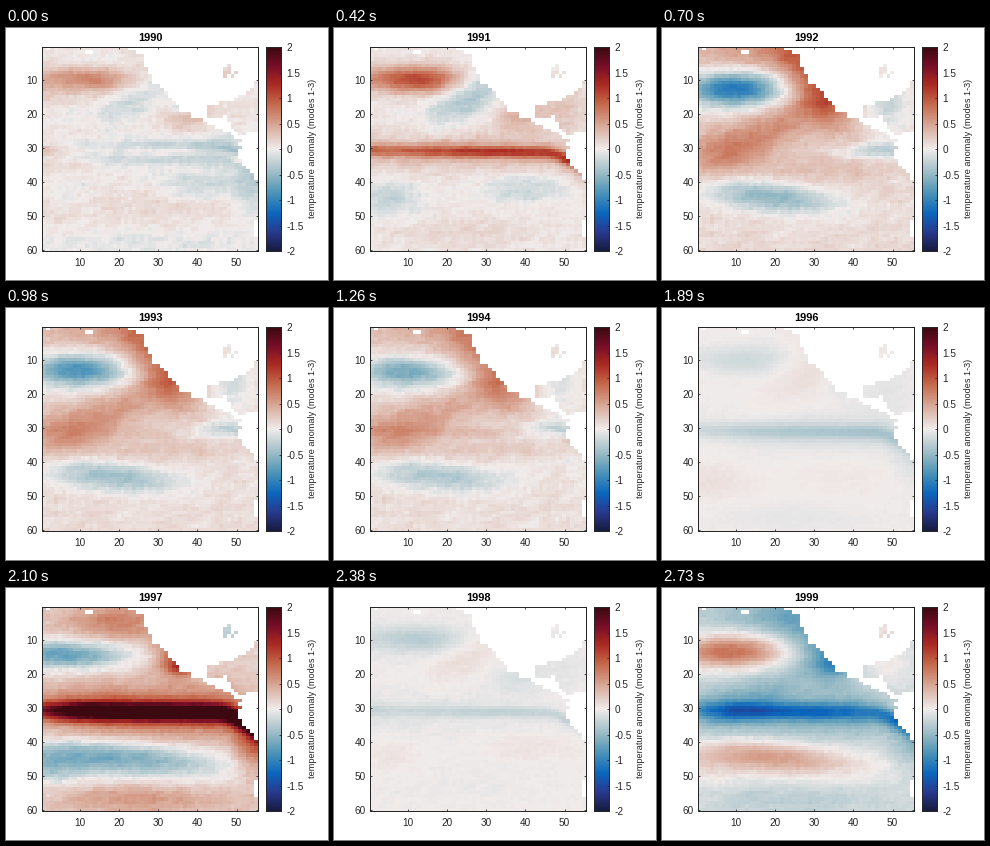
Recreate the animation shown at these times as a matplotlib script. Size 322x252 px, loop 2.8 s.

```python
import numpy as np
import matplotlib.pyplot as plt
from matplotlib.animation import FuncAnimation
from matplotlib.colors import LinearSegmentedColormap
from matplotlib.path import Path

W, H, DPI = 322, 252, 100
FRAMES, STEP = 40, 70
COLS, ROWS = 55, 60
PT = 72 / DPI  # points per pixel
INK = "#262626"

plt.rcParams["font.family"] = "Liberation Sans"

# Diverging blue-white-red scale
cold = ["#171c42", "#293a8f", "#0b66bd", "#4590b9", "#8eb5c2", "#d0d9db"]
warm = ["#e6d2cc", "#d59d89", "#c46548", "#ac2b24", "#780e28", "#3c0911"]
stops = np.insert(np.linspace(0, 1, 12), 6, 0.5)
balance = LinearSegmentedColormap.from_list(
    "balance", list(zip(stops, cold + ["#f1eceb"] + warm)))
balance.set_bad("white")

x, y = np.meshgrid(np.arange(1, COLS + 1), np.arange(1, ROWS + 1))


def bump(x0, y0, sx, sy, tilt=0.0):
    """Gaussian patch whose long axis may slope by tilt rows per column."""
    dx = x - x0
    dy = y - y0 - tilt * dx
    return np.exp(-0.5 * ((dx / sx) ** 2 + (dy / sy) ** 2))


def band(width):
    """Equatorial strip that bends south along the eastern coast."""
    mid = 30.9 + 0.6 * x / 45 + 0.12 * np.maximum(0, x - 45) ** 1.6
    return np.exp(-0.5 * ((y - mid) / width) ** 2)


def grain(seed):
    """Faint streaky texture."""
    n = np.random.default_rng(seed).normal(size=(ROWS, COLS))
    return 0.018 * (n + np.roll(n, 1, 1) + np.roll(n, 2, 1) + np.roll(n, 1, 0))


def scatter(mask, seed, count, center, spread, value):
    """Set a few random cells of the mask around a center."""
    cells = np.random.default_rng(seed).normal(center, spread, (count, 2))
    for c, r in cells.round().astype(int):
        mask[max(r, 1) - 1, c - 1] = value


def land_mask():
    pacific = [(20.5, 0), (26, 3), (28.4, 10), (36, 19), (48, 26),
               (51.5, 28), (50.3, 33), (56, 40.5)]
    atlantic = [(56, 25.5), (50, 26), (47, 21), (43, 22), (42.2, 18),
                (49, 16.3), (56, 10.5), (56, 0)]
    cells = np.column_stack([x.ravel(), y.ravel()]).astype(float)
    cells += np.random.default_rng(4).normal(0, 0.25, cells.shape)
    mask = Path(pacific + atlantic).contains_points(cells).reshape(ROWS, COLS)
    mask |= bump(56, 54, 1.2, 3) > 0.5             # southern tip
    scatter(mask, 5, 10, (48, 8), (1.4, 0.9), False)  # lakes
    scatter(mask, 6, 4, (10, 1.5), (3, 0.4), True)    # islands
    return mask


# Three spatial modes
narrow = (0.04 + (0.5 + 0.4 * np.minimum(x / 28, 1)) * band(1.25)
          + 0.3 * band(4)
          + 0.78 * bump(15, 10, 6, 2.8) + 0.6 * bump(4, 10, 8, 2.7)
          - 0.4 * bump(25, 16, 7, 4.2, -0.5)
          + 0.35 * bump(38, 21, 4, 3) + 0.25 * bump(50, 19, 5, 4)
          - 0.3 * bump(5, 45, 6, 3.5) - 0.25 * bump(40, 42, 8, 3)
          + 0.12 * bump(25, 55, 12, 3) + grain(1))

arc = (0.12 - 1.25 * bump(9.5, 13, 8.5, 3.4)
       + 0.4 * bump(16, 2, 14, 3.5) + 0.75 * bump(30, 11, 7, 7, 1.0)
       + 0.5 * bump(20, 24, 14, 5, -0.5) + 0.3 * bump(6, 31, 7, 5)
       + 0.18 * bump(30, 36, 14, 4) - 0.5 * bump(46, 31, 7, 1.7)
       - 0.65 * bump(19, 44.5, 12, 3.2, 0.12) - 0.35 * bump(48, 16, 5, 7)
       + grain(2))

wide = (0.2 + (0.9 + 0.9 * np.minimum(x / 10, 1)) * band(1.8)
        + (0.4 + 0.4 * np.minimum(x / 15, 1)) * band(5)
        + 0.5 * bump(20, 5, 10, 4)
        + 0.6 * bump(34, 15, 4, 4) + 0.7 * bump(36, 18, 2.5, 2)
        - 0.95 * bump(6, 14.5, 12, 3)
        - 0.85 * bump(20, 45, 18, 3.7, 0.08) - 0.45 * bump(1, 48, 7, 4)
        + 0.35 * bump(25, 57, 16, 3) + 0.45 * bump(54, 43, 3, 5)
        - 0.5 * bump(48, 8, 4, 3) + grain(3))

# Time step, then weights of the three modes
keys = np.array([
    (0, .9, .35, -.42), (6, 1, 0, 0), (8, .8, .4, .4), (10, 0, 1, 0),
    (18, .4, .85, -.12), (23, -.85, 0, 0), (27, -.1, .1, -.1), (30, 0, 0, 1),
    (32, .5, .1, 1.1), (35, -.6, -.1, -.3), (39, 0, -.5, -.43)])
land = land_mask()


def field(i):
    k = min(np.searchsorted(keys[:, 0], i, side="right"), len(keys) - 1)
    start, end = keys[k - 1], keys[k]
    t = (i - start[0]) / (end[0] - start[0])
    ease = 0.5 - 0.5 * np.cos(np.pi * t)
    a, b, c = (start + ease * (end - start))[1:]
    return np.ma.array(a * narrow + b * arc + c * wide, mask=land)


fig = plt.figure(figsize=(W / DPI, H / DPI), dpi=DPI, facecolor="white")


def add_axes(left, top, width, height):
    ax = fig.add_axes([left / W, 1 - (top + height) / H, width / W, height / H])
    for side in ax.spines.values():
        side.set(linewidth=PT, color=INK)
    return ax


def style_ticks(ax, axis, pad, **sides):
    ax.tick_params(axis=axis, direction="in", length=2 * PT, width=0.8 * PT,
                   pad=pad * PT, color=INK, labelcolor=INK, labelsize=10 * PT,
                   **sides)


ax = add_axes(36.2, 19.2, 216, 204)
sea = ax.imshow(field(0), cmap=balance, vmin=-2, vmax=2, aspect="auto",
                interpolation="nearest", extent=(0.5, COLS + 0.5, ROWS + 0.5, 0.5))
ax.set_xticks(range(10, 60, 10))
ax.set_yticks(range(10, 70, 10))
style_ticks(ax, "x", 7, top=True)
style_ticks(ax, "y", 4.5, right=True)

bar = add_axes(260.2, 19.2, 15, 204)
bar.imshow(np.linspace(-2, 2, 256)[:, None], cmap=balance, aspect="auto",
           origin="lower", extent=(0, 1, -2, 2))
bar.set_xticks([])
marks = np.arange(-2, 2.5, 0.5)
bar.set_yticks(marks, [f"{m:g}" for m in marks])
bar.yaxis.tick_right()
style_ticks(bar, "y", 5.2)

fig.text(306.5 / W, 1 - 120 / H, "temperature anomaly (modes 1-3)", rotation=90,
         ha="center", va="center", fontsize=9.2 * PT, color=INK)
title = fig.text(144.5 / W, 1 - 12.6 / H, "1990", ha="center", va="baseline",
                 fontsize=11 * PT, fontweight="bold", color="black")


def update(i):
    sea.set_data(field(i))
    title.set_text(str(1990 + i // 4))
    return sea, title


anim = FuncAnimation(fig, update, frames=FRAMES, interval=STEP, repeat=True,
                     repeat_delay=0, blit=False)
plt.show()
```
